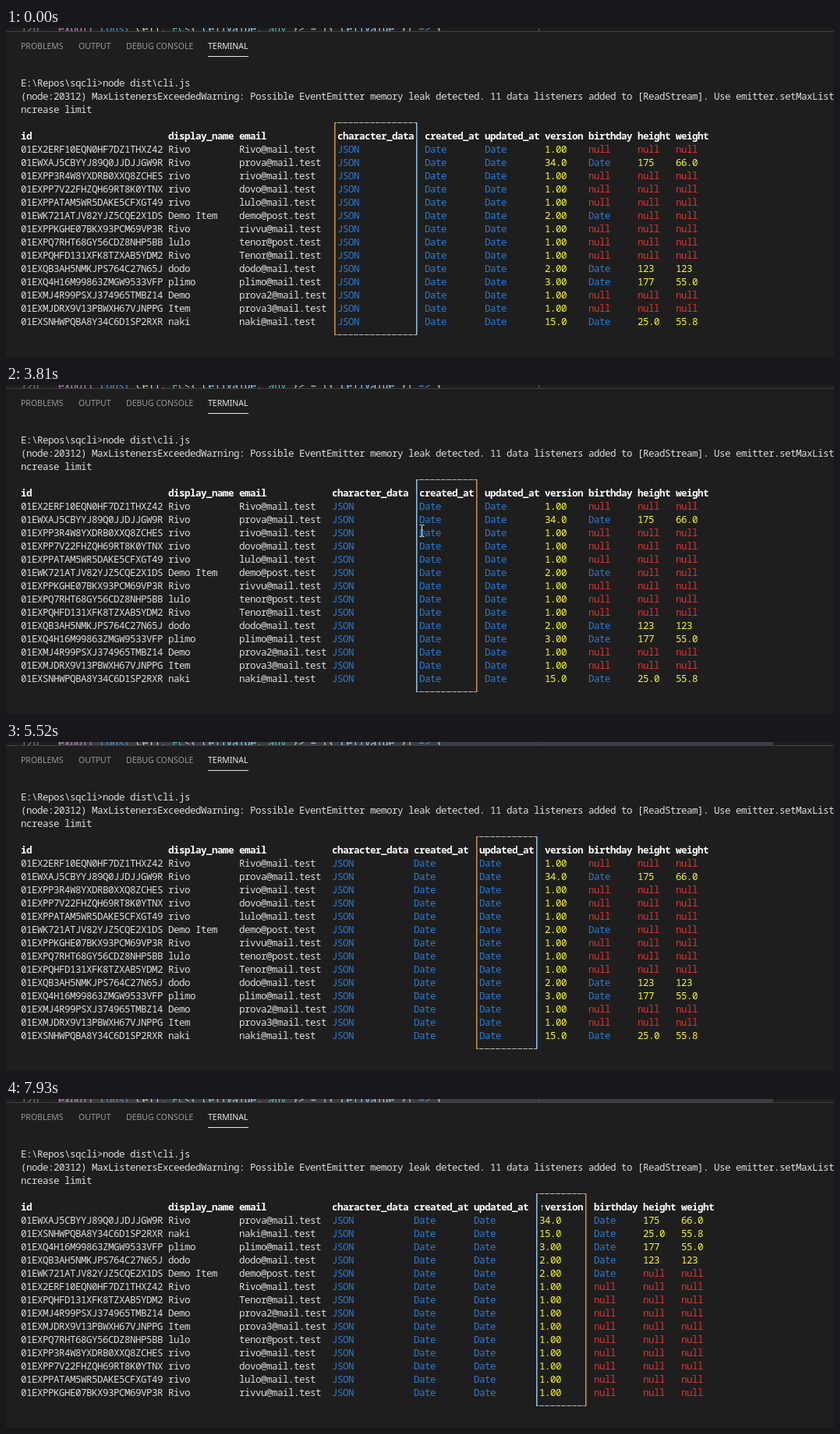
Write an HTML page with a canvas that moves like this. It is 1062 px wide and 422 px high and loops after 8 s.

```html
<!DOCTYPE html>
<html lang="en">
<head>
<meta charset="utf-8">
<title>Terminal table</title>
<style>
html, body { margin: 0; width: 100%; height: 100%; overflow: hidden; background: #1e1e1e; }
canvas { display: block; }
</style>
</head>
<body>
<canvas id="stage" width="1062" height="422"></canvas>
<script>
const ctx = document.getElementById('stage').getContext('2d', { alpha: false });
const LOOP = 8000, CELL = 7, LINE = 17, LEFT = 19, HEADER_LINE = 4;
const MONO = '"Noto Sans Mono", "DejaVu Sans Mono", monospace';
const SANS = '"Noto Sans", "Open Sans", sans-serif';
const WHITE = '#dedede', BLUE = '#2b7bd4', YELLOW = '#fafa1e', RED = '#dc3636';

const columns = [
  ['id', 26], ['display_name', 12], ['email', 16], ['character_data', 14], ['created_at', 10],
  ['updated_at', 10], ['version', 7], ['birthday', 8], ['height', 6], ['weight', 6]
].map(([name, width]) => ({ name, width }));
const EMAIL = 2, DATA = 3, CREATED = 4, UPDATED = 5, VERSION = 6, BIRTHDAY = 7;

// id, name, email, version, birthday, height, weight
const rows = `01EX2ERF10EQN0HF7DZ1THXZ42,Rivo,Rivo@mail.test,1.00
01EWXAJ5CBYYJ89Q0JJDJJGW9R,Rivo,prova@mail.test,34.0,Date,175,66.0
01EXPP3R4W8YXDRB0XXQ8ZCHES,rivo,rivo@mail.test,1.00
01EXPP7V22FHZQH69RT8K0YTNX,rivo,dovo@mail.test,1.00
01EXPPATAM5WR5DAKE5CFXGT49,rivo,lulo@mail.test,1.00
01EWK721ATJV82YJZ5CQE2X1DS,Demo Item,demo@post.test,2.00,Date
01EXPPKGHE07BKX93PCM69VP3R,Rivo,rivvu@mail.test,1.00
01EXPQ7RHT68GY56CDZ8NHP5BB,lulo,tenor@post.test,1.00
01EXPQHFD131XFK8TZXAB5YDM2,Rivo,Tenor@mail.test,1.00
01EXQB3AH5NMKJPS764C27N65J,dodo,dodo@mail.test,2.00,Date,123,123
01EXQ4H16M99863ZMGW9533VFP,plimo,plimo@mail.test,3.00,Date,177,55.0
01EXMJ4R99PSXJ374965TMBZ14,Demo,prova2@mail.test,1.00
01EXMJDRX9V13PBWXH67VJNPPG,Item,prova3@mail.test,1.00
01EXSNHWPQBA8Y34C6D1SP2RXR,naki,naki@mail.test,15.0,Date,25.0,55.8`.split('\n').map(line => {
  const [id, name, email, version, birthday = 'null', height = 'null', weight = 'null'] = line.split(',');
  return [id, name, email, 'JSON', 'Date', 'Date', version, birthday, height, weight];
});
const descending = [1, 13, 10, 9, 5, 0, 8, 11, 12, 7, 2, 3, 4, 6].map(i => rows[i]);
const ascending = [...descending].reverse();

// Each timeline lists [start time, value]; values change abruptly.
const selection = [
  [0, DATA], [3810, CREATED], [4120, UPDATED], [4280, VERSION], [4510, BIRTHDAY],
  [5390, VERSION], [5520, UPDATED], [5670, CREATED], [5830, DATA], [5990, EMAIL],
  [6540, DATA], [6720, CREATED], [6910, UPDATED], [7090, VERSION]
];
const sorting = [
  [0, { arrow: '', rows }], [7470, { arrow: '↓', rows: ascending }], [7930, { arrow: '↑', rows: descending }]
];
const pointer = [
  [0, null], [130, [600, 2]], [207, [760, 150]], [283, [980, 360]], [360, null],
  [680, [1054, 421]], [837, [1020, 421]], [993, [985, 421]], [1150, null],
  [1700, [1005, 408]], [1840, [790, 262]], [1980, [420, 100]], [2120, [169, 4]], [2260, [330, 6]], [2400, [556, 22]],
  [3340, [550, 70]], [3500, [540, 140]], [3650, [533, 187]],
  [4970, [555, 110]], [5110, [575, 18]], [5250, null]
];
const highlight = [[0, false], [130, true], [283, false], [5250, true]];
const valueAt = (timeline, time) => timeline.findLast(([start]) => start <= time)[1];

function text(string, x, y, color, font) {
  ctx.font = font;
  ctx.fillStyle = color;
  ctx.fillText(string, x, y);
}
function rect(x, y, width, height, color) {
  ctx.fillStyle = color;
  ctx.fillRect(x, y, width, height);
}
// The terminal sets its 12.5px type a little tight, on whole-pixel cells.
function terminalText(string, x, line, color = WHITE, weight = '') {
  ctx.letterSpacing = '-0.5px';
  text(string, x, 75 + line * LINE, color, `${weight} 12.5px ${MONO}`);
  ctx.letterSpacing = '0px';
}

function drawEditorStrip(highlighted) {
  ctx.save();
  ctx.beginPath();
  ctx.rect(0, 0, 1062, 5);
  ctx.clip();
  if (highlighted) rect(67, 0, 917, 5, '#3a3d41');
  const font = `12.833px ${MONO}`;
  text('126', 19, 5, '#858585', font);
  let x = 67;
  for (const [part, color] of [
    ['export ', '#c586c0'], ['const ', '#569cd6'], ['Cell', '#dcdcaa'], [': ', '#d4d4d4'], ['FC', '#4ec9b0'],
    ['<{ ', '#d4d4d4'], ['cellValue', '#9cdcfe'], [': ', '#d4d4d4'], ['any', '#4ec9b0'], [' }> = ({ ', '#d4d4d4'],
    ['cellValue', '#9cdcfe'], [' }) ', '#d4d4d4'], ['=> ', '#569cd6'], ['{', '#d4d4d4']
  ]) {
    text(part, x, 5, color, font);
    x += part.length * 7.7;
  }
  rect(683, 0, 1, 4, '#5a5a5a');
  rect(0, 4, 1062, 1, '#414141');
  ctx.restore();
}

function drawTabs() {
  [['PROBLEMS', 19], ['OUTPUT', 93], ['DEBUG CONSOLE', 154], ['TERMINAL', 259]].forEach(([name, x], i) =>
    text(name, x, 27, i === 3 ? '#e7e7e7' : '#989898', `10.5px ${SANS}`));
  rect(259, 36, 52, 1, '#e7e7e7');
}

function drawBorder(x, width) {
  const top = 121, bottom = 393, right = x + (width + 1) * CELL;
  for (const y of [top, bottom]) {
    for (let dash = x + CELL; dash < right; dash += CELL) rect(dash, y, CELL - 1, 1, '#b8b8b8');
    rect(x + 4, y, 2, 1, '#b8b8b8');
    rect(right, y, 4, 1, '#b8b8b8');
  }
  for (const edge of [x, right]) {
    const odd = (edge - LEFT) / CELL % 2;
    rect(edge + 3, top, 1.5, bottom - top + 1, odd ? '#c7964a' : '#8cc4e8');
  }
}

function cellColor(column, value) {
  if (value === 'null') return RED;
  if (value === 'Date' || value === 'JSON') return BLUE;
  return column >= VERSION ? YELLOW : WHITE;
}

function drawTable(selected, { arrow, rows }) {
  let x = LEFT;
  columns.forEach(({ name, width }, column) => {
    const title = column === VERSION ? arrow + name : name;
    const cells = Math.max(width, title.length);
    const active = column === selected;
    if (active) {
      drawBorder(x, cells);
      x += CELL;
    }
    terminalText(title, x, HEADER_LINE, '#ffffff', 'bold');
    rows.forEach((row, i) =>
      terminalText(row[column], x, HEADER_LINE + 1 + i, cellColor(column, row[column])));
    x += (cells + (active ? 2 : 1)) * CELL;
  });
}

function drawPointer([x, y]) {
  ctx.save();
  ctx.translate(x, y);
  if (y > 45 && y < 420) {
    ctx.translate(.5, .5);
    ctx.lineWidth = 1;
    ctx.strokeStyle = '#ffffff';
    ctx.stroke(new Path2D('M-3-8h2l1 1l1-1h2M0-7V6M-3 7h2l1-1l1 1h2'));
  } else {
    const arrow = new Path2D('M.5.5V17l3.8-3.6 2.6 5.8 2.6-1.1-2.5-5.7h5.2z');
    ctx.fillStyle = '#ffffff';
    ctx.strokeStyle = '#000000';
    ctx.fill(arrow);
    ctx.stroke(arrow);
  }
  ctx.restore();
}

function draw(now) {
  const time = now % LOOP;
  rect(0, 0, 1062, 422, '#1e1e1e');
  drawEditorStrip(valueAt(highlight, time));
  drawTabs();
  terminalText('E:\\Repos\\sqcli>node dist\\cli.js', LEFT, 0);
  terminalText('(node:20312) MaxListenersExceededWarning: Possible EventEmitter memory leak detected. ' +
    '11 data listeners added to [ReadStream]. Use emitter.setMaxListeners() to i', LEFT, 1);
  terminalText('ncrease limit', LEFT, 2);
  drawTable(valueAt(selection, time), valueAt(sorting, time));
  const position = valueAt(pointer, time);
  if (position) drawPointer(position);
}

const start = performance.now();
function tick() {
  draw(performance.now() - start);
  requestAnimationFrame(tick);
}
tick();
</script>
</body>
</html>
```
